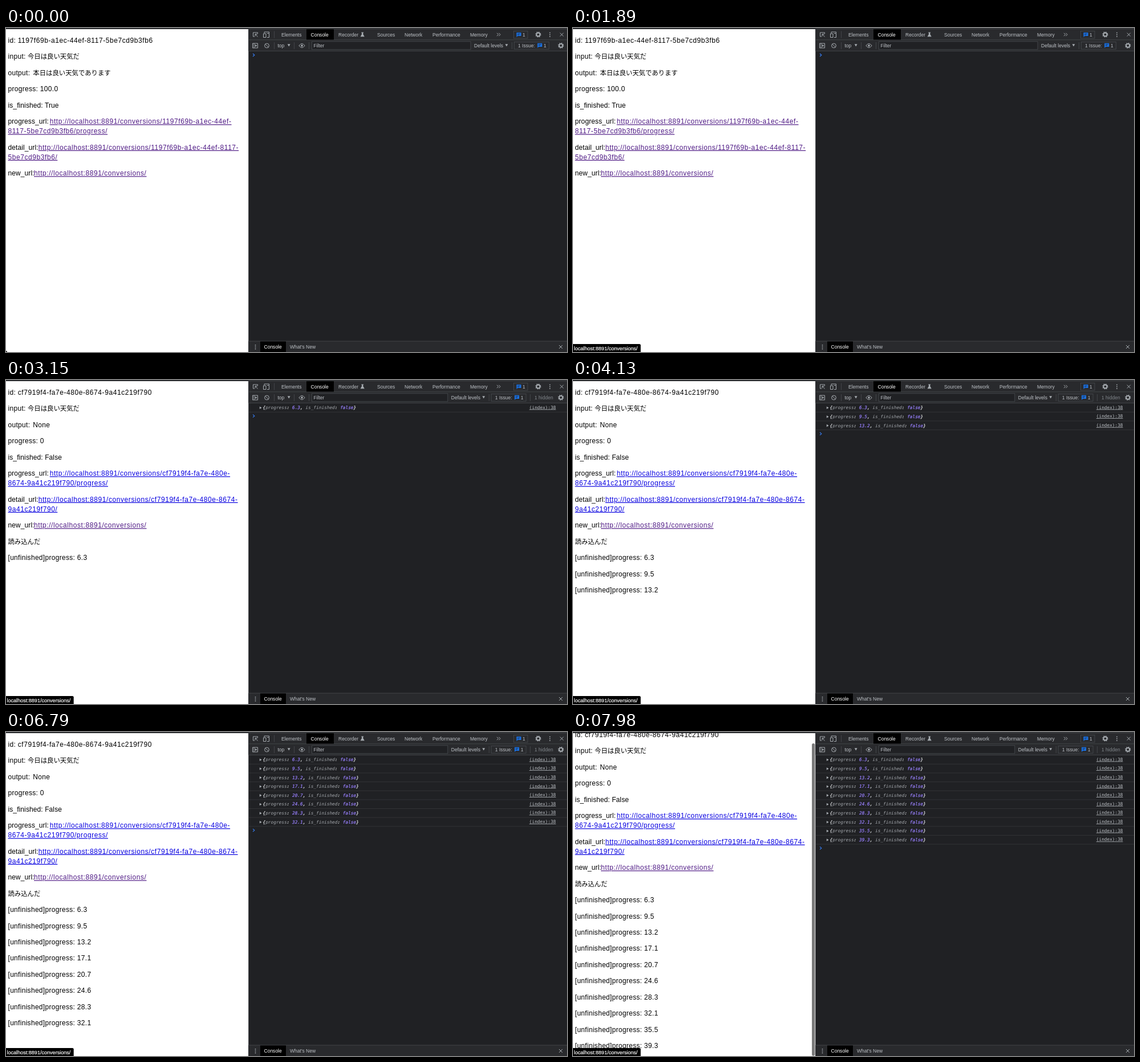
An HTML page that plays this animation: 984 px wide and 569 px high, repeating every 8 s.

```html
<!DOCTYPE html>
<html lang="ja">
<head>
<meta charset="utf-8">
<title>Conversion progress</title>
<style>
html, body { margin: 0; width: 100%; height: 100%; overflow: hidden; background: #202124; }
svg { display: block; width: 984px; height: 569px; }
text { white-space: pre; }
.page { font: 12px "Liberation Sans", sans-serif; letter-spacing: .3px; fill: #000; }
.page .label { letter-spacing: .1px; }
.page .code, .page .link { letter-spacing: .57px; }
.page .ja { font: 11.38px "Noto Sans CJK JP", "Noto Sans CJK", sans-serif; letter-spacing: 0; }
.link { fill: #0800e0; text-decoration: underline; }
.link.visited { fill: #4f1a85; }
.tools { font: 8.53px "Liberation Sans", sans-serif; fill: #bdc1c6; }
.tools .on { fill: #fff; }
.tools .dim { fill: #80868b; }
.log { font: 7.78px "DejaVu Sans Mono", monospace; fill: #e8eaed; }
.log .entry { font-style: italic; stroke: #e8eaed; stroke-width: .2; }
.log .key { fill: #a4a8ad; stroke: none; }
.log .value { fill: #9980ff; stroke: #9980ff; }
.log .ref { fill: #bdc1c6; text-decoration: underline; }
.bubble { font: 9.07px "Liberation Sans", sans-serif; }
.bubble text { fill: #fff; stroke: #fff; stroke-width: .2; }
.bar { fill: #292a2d; }
.rule { stroke: #494c50; stroke-width: .8; fill: none; }
.row-rule { stroke: #36383b; stroke-width: .8; }
.icon { stroke: #a6abb0; stroke-width: 1; fill: none; }
.solid { fill: #a6abb0; }
</style>
</head>
<body>
<svg viewBox="0 0 984 569">
  <defs>
    <clipPath id="view"><rect y="2" width="425.2" height="567"/></clipPath>
    <g id="gear">
      <circle r="3" class="icon" style="stroke-width:1.8"/>
      <circle r="4.3" class="icon" style="stroke-width:1.5;stroke-dasharray:1.7 1.677"/>
    </g>
    <g id="dots" class="solid"><circle cy="-3.3" r=".9"/><circle r=".9"/><circle cy="3.3" r=".9"/></g>
    <path id="close" class="icon" d="M-3-3 3 3M3-3-3 3"/>
    <path id="down" class="solid" d="M-2.4-2H2.4L0 2.3Z"/>
    <g id="note">
      <path fill="#1a73e8" d="M-4-3.7H4V2.4H-1.8L-4 4.4Z"/>
      <path stroke="#202124" stroke-width=".8" d="M-2.4-1.7H2.4M-2.4.3H1"/>
    </g>
  </defs>

  <rect width="984" height="569" fill="#292b2e"/>
  <rect y="2" width="425.2" height="567" fill="#fff"/>
  <g clip-path="url(#view)">
    <g class="page" id="page"><g id="before"></g><g id="after"></g></g>
    <rect id="thumb" x="419" y="20" width="5.3" height="548.5" rx="2.6" fill="#7b7b7b"/>
  </g>
  <path d="M0 566.5 2.5 569H0Z"/>
  <g class="bubble" id="bubble">
    <path d="M0 555H116.5Q118.7 555 118.7 557.2V569H0Z"/>
    <text x="1.5" y="565.6">localhost:8891/conversions/</text>
  </g>

  <rect x="426" y="40.5" width="558" height="509.5" fill="#202124"/>
  <rect x="425.2" y="2" width="558.8" height="38.3" class="bar"/>
  <rect x="425.2" y="550" width="558.8" height="19" class="bar"/>
  <path class="rule" d="M425.5 1.5H984M426 20.8H984M426 40.4H984M426 550H984M470.5 5.5V17.5M470.5 25V37M505.5 25V37M531.5 25V37"/>
  <path d="M527 2H575V20.5H527ZM446 550.4H491V569H446Z"/>

  <g class="tools" id="tools">
    <path class="icon" d="M436 15H433.5V8H441.5V10M437.5 11 441.5 15.5M437 14.5V10.7H441"/>
    <path class="icon" d="M453 9.5V7H461.5V9M451.5 10H456V16.5H451.5ZM458 16.5H461.5V9.5H458"/>
    <path class="icon" d="M432.5 27H441.5V35H432.5ZM435 27V35"/>
    <path class="solid" d="M437 28.7 440.5 31 437 33.3Z"/>
    <circle class="icon" cx="457.5" cy="31" r="3.9"/>
    <path class="icon" d="M454.8 28.2 460.2 33.8"/>
    <path class="icon" d="M513.8 31Q519 24 524.2 31Q519 38 513.8 31Z"/>
    <circle class="solid" cx="519" cy="31" r="1.8"/>
    <path class="solid" d="M623.2 7.5H627.2V8.4H626.4V11L628.8 15.2H621.6L624 11V8.4H623.2Z"/>
    <path class="icon" d="M861 8.8 863.6 11.5 861 14.2M864.4 8.8 867 11.5 864.4 14.2"/>
    <rect class="rule" x="890.5" y="5.3" width="24.5" height="12.8"/>
    <use href="#note" x="899.5" y="11.7"/>
    <use href="#gear" x="933.5" y="11.5"/>
    <use href="#dots" x="954" y="11.7"/>
    <use href="#close" x="974.8" y="11.6"/>
    <use href="#down" x="496.2" y="30.3"/>
    <rect id="filter" x="536.5" y="23.8" height="14" fill="#202124" stroke="#494c50" stroke-width=".8"/>
    <g id="levels">
      <use href="#down" x="878" y="30.3"/>
      <path class="rule" d="M887.5 25V37"/>
      <rect class="rule" x="891.3" y="24.4" width="61" height="12.8"/>
      <use href="#note" x="936.3" y="30.5"/>
    </g>
    <g id="hidden"><path class="rule" d="M919.5 25V37"/></g>
    <use href="#gear" x="973.3" y="30.8"/>
    <use href="#dots" x="437.5" y="560.2"/>
    <use href="#close" x="973" y="560"/>
  </g>

  <g class="log" id="log"></g>
  <path id="prompt" d="M433 45 435.8 47.5 433 50" fill="none" stroke="#367cf1" stroke-width="1.2"/>
</svg>

<script>
const LOOP = 8000, LOAD = 2590, PITCH = 28.44, WRAP = 17.07, ROW = 15.64;
const BASE = 'http://localhost:8891/conversions/';
const progress = ['6.3', '9.5', '13.2', '17.1', '20.7', '24.6', '28.3', '32.1', '35.5', '39.3'];
const arrivals = [3150, 3640, 4130, 4690, 5180, 5740, 6230, 6790, 7280, 7840];
// [time, value] pairs, held until the next one
const bubbleSteps = [[0, 0], [1680, .25], [1750, .5], [1820, .8], [1890, 1], [2310, .65], [2380, .3],
  [2450, 0], [2590, .4], [2660, .65], [2730, .85], [2800, 1]];
const scrollSteps = [[0, 0], [7910, 10], [7980, 17]];

const $ = id => document.getElementById(id);

function add(parent, tag, attrs = {}, content = '') {
  const el = document.createElementNS('http://www.w3.org/2000/svg', tag);
  for (const key in attrs) el.setAttribute(key, attrs[key]);
  el.textContent = content;
  return parent.appendChild(el);
}
const write = (parent, x, y, content, cls = '') => add(parent, 'text', { x, y, class: cls }, content);
const held = (steps, t) => steps.filter(step => step[0] <= t).pop()[1];
const show = (el, on) => el.setAttribute('visibility', on ? 'visible' : 'hidden');
const lineY = (paragraph, wraps = 0) => 26 + PITCH * paragraph + WRAP * wraps;

function writeDetails(parent, id, output, percent, finished, link) {
  const parts = id.split('-');
  const head = n => parts.slice(0, n).join('-') + '-';
  const tail = n => parts.slice(n).join('-');
  const left = (y, content, cls) => write(parent, 3.5, y, content, cls);

  add(left(lineY(0), 'id: '), 'tspan', { class: 'code' }, id);
  left(lineY(1), 'input:');
  write(parent, 38, lineY(1), '今日は良い天気だ', 'ja');
  left(lineY(2), 'output:');
  write(parent, 47.3, lineY(2), output, output === 'None' ? '' : 'ja');
  left(lineY(3), 'progress: ' + percent);
  left(lineY(4), 'is_finished: ' + finished, 'label');
  left(lineY(5), 'progress_url:', 'label');
  write(parent, 76.7, lineY(5), BASE + head(3), link);
  left(lineY(5, 1), tail(3) + '/progress/', link);
  left(lineY(6, 1), 'detail_url:', 'label');
  write(parent, 56.7, lineY(6, 1), BASE + head(4), link);
  left(lineY(6, 2), tail(4) + '/', link);
  left(lineY(7, 2), 'new_url:', 'label');
  write(parent, 49, lineY(7, 2), BASE, 'link visited');
}

writeDetails($('before'), '1197f69b-a1ec-44ef-8117-5be7cd9b3fb6', '本日は良い天気であります', '100.0', 'True', 'link visited');
writeDetails($('after'), 'cf7919f4-fa7e-480e-8674-9a41c219f790', 'None', '0', 'False', 'link');
write($('after'), 3.5, lineY(8, 2), '読み込んだ', 'ja');

const tabs = [[483, 'Elements'], [534.5, 'Console', 'on'], [583, 'Recorder'], [651, 'Sources'],
  [699, 'Network'], [748, 'Performance'], [814, 'Memory'], [906, '1']];
for (const [x, label, cls] of tabs) write($('tools'), x, 14.7, label, cls);
write($('tools'), 476.5, 33.7, 'top');
write($('tools'), 539.5, 33.9, 'Filter');
write($('levels'), 821, 33.7, 'Default levels');
write($('levels'), 898, 33.7, '1 Issue:');
write($('levels'), 943, 33.7, '1');
write($('hidden'), 927, 33.7, '1 hidden', 'dim');
write($('tools'), 452.5, 563.2, 'Console', 'on');
write($('tools'), 498, 563.2, "What's New");

const updates = progress.map((value, i) => {
  const line = write($('page'), 3.5, lineY(9 + i, 2), `[unfinished]progress: ${value}`);
  const row = add($('log'), 'g', { transform: `translate(0 ${ROW * i})` });
  add(row, 'path', { class: 'solid', d: 'M444.8 46.5 448.6 48.8 444.8 51.1Z' });
  const entry = write(row, 450.5, 51.3, '', 'entry');
  const pieces = [['{'], ['progress', 'key'], [': '], [value, 'value'], [', '],
    ['is_finished', 'key'], [': '], ['false', 'value'], ['}']];
  for (const [piece, cls = ''] of pieces) add(entry, 'tspan', { class: cls }, piece);
  write(row, 917.8, 50.6, '(index):38', 'ref');
  add(row, 'path', { class: 'row-rule', d: 'M426 56.3H984' });
  return [line, row];
});

function draw(t) {
  const loaded = t >= LOAD;
  const count = arrivals.filter(time => time <= t).length;
  const scroll = held(scrollSteps, t);

  show($('before'), !loaded);
  show($('after'), loaded);
  updates.forEach((pair, i) => pair.forEach(el => show(el, i < count)));
  $('page').setAttribute('transform', `translate(0 ${-scroll})`);
  show($('thumb'), scroll > 0);
  $('bubble').setAttribute('opacity', held(bubbleSteps, t));

  $('filter').setAttribute('width', count ? 238.3 : 278.5);
  $('levels').setAttribute('transform', `translate(${count ? -40.2 : 0} 0)`);
  show($('hidden'), count > 0);
  $('prompt').setAttribute('transform', `translate(0 ${ROW * count})`);
}

const start = performance.now();
function tick(now) {
  draw(Math.max(0, now - start) % LOOP);
  requestAnimationFrame(tick);
}
draw(0);
requestAnimationFrame(tick);
</script>
</body>
</html>
```
